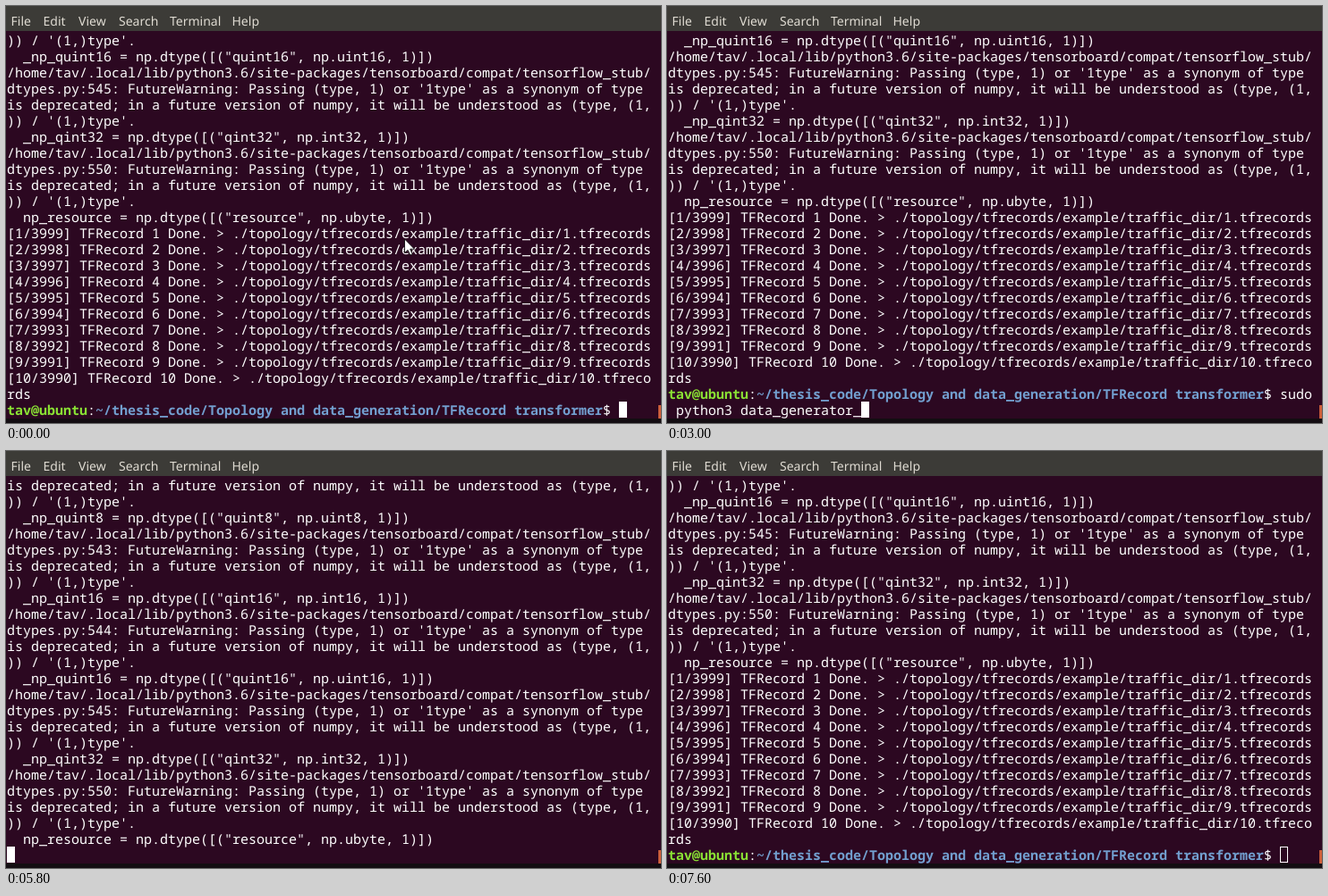
An HTML page that plays this animation: 732x467 px, repeating every 7700 ms.

```html
<!DOCTYPE html>
<html lang="en">
<head>
<meta charset="utf-8">
<title>Terminal</title>
<style>
  html, body { margin: 0; width: 100%; height: 100%; overflow: hidden; background: #2c0821; }
  svg { display: block; width: 100%; height: 100%; }
  text { white-space: pre; text-rendering: geometricPrecision; }
  #menu text { font: 14px "Noto Sans", "Open Sans", sans-serif; fill: #dfdbd2; }
  #screen text { font: 15px "Noto Sans Mono", "DejaVu Sans Mono", monospace; fill: #fff; }
  #screen .user { font-weight: bold; fill: #8ae234; }
  #screen .path { font-weight: bold; fill: #729fcf; }
</style>
</head>
<body>
<svg viewBox="0 0 732 467" xmlns="http://www.w3.org/2000/svg">
  <rect width="732" height="467" fill="#2c0821"/>
  <rect width="732" height="28" fill="#3c3b37"/>
  <rect y="462" width="732" height="5" fill="#130d12"/>
  <rect x="729" y="447" width="3" height="15" fill="#cc5f3a"/>
  <g id="menu"></g>
  <g id="screen"></g>
  <rect id="caret"/>
  <path id="mouse" d="M0 0V15.5L3.6 12.2L6.2 18L8.7 16.9L6.2 11.2H11Z" fill="#fff" stroke="#111" stroke-width=".9"/>
</svg>
<script>
const LOOP = 7700, COLS = 80, ROWS = 24, CELL_W = 9, CELL_H = 18, LEFT = 1, TOP = 29;
const NS = "http://www.w3.org/2000/svg";
const $ = id => document.getElementById(id);

function add(parent, tag, attrs = {}, text = "") {
  const el = document.createElementNS(NS, tag);
  for (const key in attrs) el.setAttribute(key, attrs[key]);
  el.textContent = text;
  return parent.appendChild(el);
}

// Log contents
const USER = "tav";
const LIB = `/home/${USER}/.local/lib/python3.6/site-packages/`;
const CMD = "sudo python3 data_generator_nsf.py ";
const PROMPT = [
  [USER + "@ubuntu", "user"], [":", ""],
  ["~/thesis_code/Topology and data_generation/TFRecord transformer", "path"], ["$ ", ""]
];
const PROMPT_LEN = PROMPT.reduce((n, [s]) => n + s.length, 0);
const FIRST_ROW = COLS - PROMPT_LEN;

const wrap = s => s.match(new RegExp(`.{1,${COLS}}`, "g"));

function warnings(module, firstLine) {
  const types = ["qint8", "quint8", "qint16", "quint16", "qint32", "resource"];
  return types.flatMap((type, i) => {
    const last = type === "resource";
    const line = firstLine + (last ? 9 : i);
    const name = last ? "np_resource" : "_np_" + type;
    const base = last ? "ubyte" : type.slice(1);
    return [
      ...wrap(`${LIB}${module}/dtypes.py:${line}: FutureWarning: Passing (type, 1) or '1type' ` +
        "as a synonym of type is deprecated; in a future version of numpy, " +
        "it will be understood as (type, (1,)) / '(1,)type'."),
      `  ${name} = np.dtype([("${type}", np.${base}, 1)])`
    ];
  });
}

const flowWarnings = warnings("tensorflow/python/framework", 516);
const boardWarnings = warnings("tensorboard/compat/tensorflow_stub", 541);
const records = Array.from({ length: 10 }, (_, i) => i + 1).flatMap(n => wrap(
  `[${n}/${4000 - n}] TFRecord ${n} Done. > ./topology/tfrecords/example/traffic_dir/${n}.tfrecords`));

const history = [...boardWarnings, ...records];
const output = [...flowWarnings, ...boardWarnings, ...records];
const FLOW = flowWarnings.length, BOARD = FLOW + boardWarnings.length;

// [time, characters typed]
const typing = [
  [0, 0], [500, 1], [600, 2], [900, 3], [1000, 4], [1200, 6], [1300, 7], [1600, 8], [1700, 10],
  [2000, 11], [2100, 12], [2200, 14], [2500, 17], [3000, 28], [3300, 29], [3500, 30], [3900, 31], [4000, 35]
];
// [time, output rows printed]
const printing = [
  [4900, 0], [5000, 15], [5100, FLOW], [5700, FLOW + 15], [5800, BOARD],
  [6000, BOARD + 3], [6100, BOARD + 5], [6300, output.length]
];
const ENTER = 4900, DONE = 6300, READY = 6400, BLUR = 7000;
// [time, x, y]
const pointer = [[6700, 445.5, 261], [6800, 398, 165], [6900, 268, 26]];

const at = (steps, t) => steps.reduce((last, step) => step[0] <= t ? step : last, steps[0]);

// Rows up to the caret, and the caret column
function terminal(t) {
  const typed = CMD.slice(0, at(typing, t)[1]);
  const rows = [...history, [...PROMPT, [typed.slice(0, FIRST_ROW), ""]]];
  if (typed.length < FIRST_ROW) return { rows, col: PROMPT_LEN + typed.length };
  rows.push(typed.slice(FIRST_ROW));
  if (t < ENTER) return { rows, col: typed.length - FIRST_ROW };
  rows.push(...output.slice(0, at(printing, t)[1]));
  if (t < READY) return { rows: [...rows, ""], col: 0 };
  return { rows: [...rows, PROMPT], col: PROMPT_LEN };
}

// Stage
[["File", 5.5], ["Edit", 41.5], ["View", 81], ["Search", 126], ["Terminal", 183], ["Help", 252.5]]
  .forEach(([label, x]) => add($("menu"), "text", { x, y: 22 }, label));

const grid = Array.from({ length: COLS }, (_, i) => LEFT + i * CELL_W).join(" ");
const lines = Array.from({ length: ROWS }, (_, i) =>
  add($("screen"), "text", { x: grid, y: TOP + 15 + i * CELL_H }));

function setLine(el, row) {
  const parts = typeof row === "string" ? [[row, ""]] : row;
  const key = JSON.stringify(parts);
  if (el.key === key) return;
  el.key = key;
  el.textContent = "";
  parts.forEach(([s, cls]) => s && add(el, "tspan", { class: cls }, s));
}

function setCaret(col, t) {
  const hollow = t >= BLUR, inset = hollow ? 0.5 : 0;
  const attrs = {
    x: LEFT + col * CELL_W + inset, y: TOP + (ROWS - 1) * CELL_H + inset,
    width: CELL_W - 2 * inset, height: CELL_H - 2 * inset,
    fill: hollow ? "none" : "#fff", stroke: hollow ? "#fff" : "none",
    visibility: t >= DONE && t < READY ? "hidden" : "visible"
  };
  for (const key in attrs) $("caret").setAttribute(key, attrs[key]);
}

function setMouse(t) {
  const shown = t < 500 || (t >= pointer[0][0] && t < BLUR);
  const [, x, y] = at(pointer, t);
  $("mouse").setAttribute("visibility", shown ? "visible" : "hidden");
  $("mouse").setAttribute("transform", `translate(${x} ${y})`);
}

function draw(t) {
  const { rows, col } = terminal(t);
  const view = rows.slice(-ROWS);
  lines.forEach((el, i) => setLine(el, view[i]));
  setCaret(col, t);
  setMouse(t);
}

function tick() {
  draw(performance.now() % LOOP);
  requestAnimationFrame(tick);
}
tick();
</script>
</body>
</html>
```
